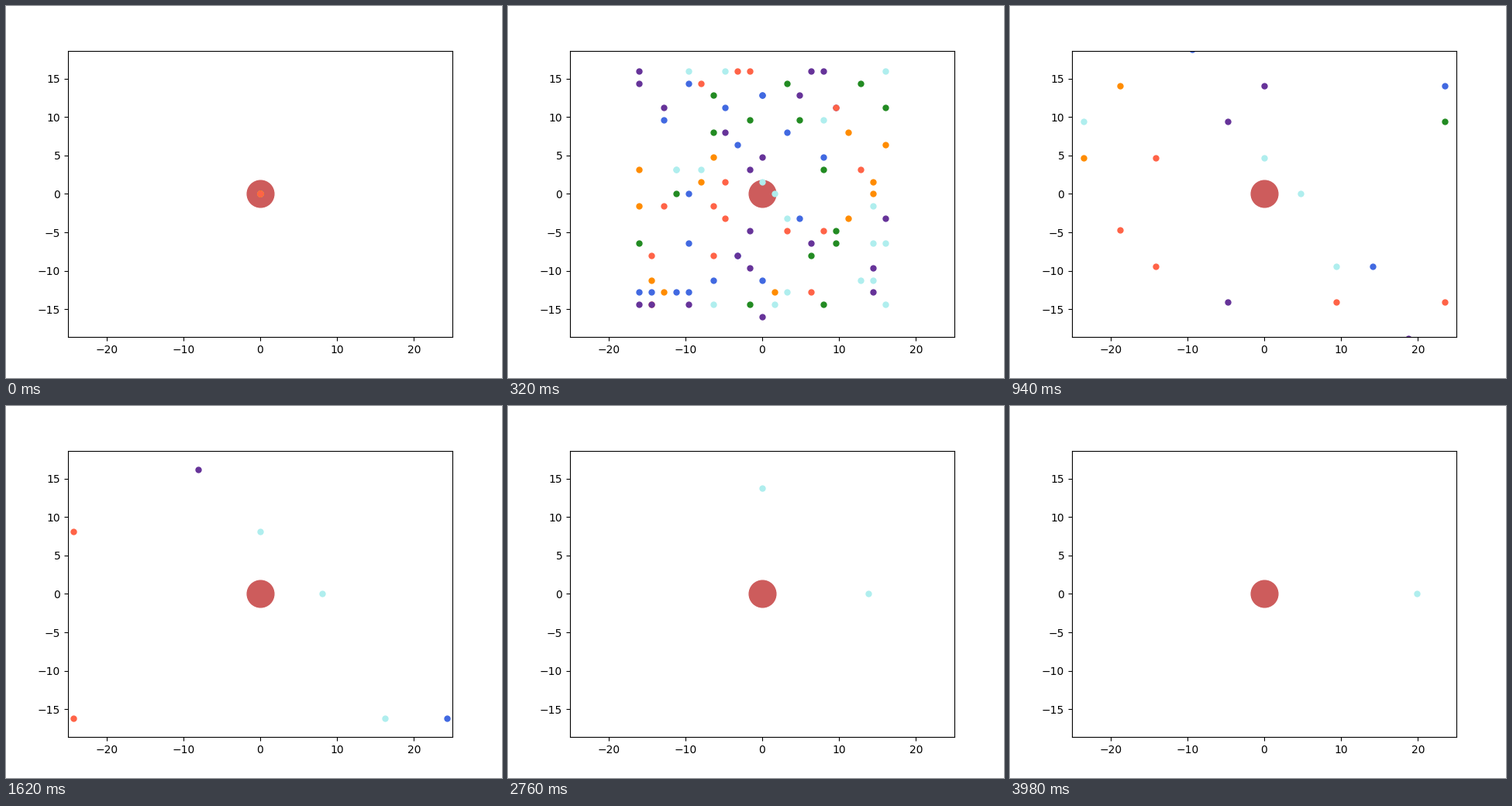
A matplotlib script that plays this animation: 640 by 480 pixels, repeating every 4000 ms.

```python
import random

import matplotlib.pyplot as plt
from matplotlib.animation import FuncAnimation

FRAMES = 200
INTERVAL = 20
STEP = 0.1
HALF_W = 25
DOTS = 100
TOP_SPEED = 10
COLORS = ["royalblue", "forestgreen", "rebeccapurple",
          "paleturquoise", "darkorange", "tomato"]

# The slow dots stay in view longest, so their velocities are set by hand.
SLOW = [
    ("royalblue", -2, 4), ("royalblue", 5, 3), ("royalblue", 3, -2),
    ("forestgreen", 5, 2),
    ("rebeccapurple", 0, 3), ("rebeccapurple", -1, 2),
    ("rebeccapurple", -1, -3), ("rebeccapurple", 4, -4),
    ("paleturquoise", 0, 1), ("paleturquoise", 1, 0),
    ("paleturquoise", 2, -2), ("paleturquoise", -5, 2),
    ("tomato", -3, 1), ("tomato", -4, -1), ("tomato", -3, -2),
    ("tomato", 2, -3),
    ("darkorange", -5, 1), ("darkorange", -4, 3),
    ("tomato", 5, -3),
]


def fast_dot(rng):
    """Random colour and whole-number velocity outside the slow range."""
    vx = vy = 0
    while abs(vx) <= 5 and abs(vy) <= 4:
        vx = rng.randint(-TOP_SPEED, TOP_SPEED)
        vy = rng.randint(-TOP_SPEED, TOP_SPEED)
    return rng.choice(COLORS), vx, vy


fig, ax = plt.subplots(figsize=(6.4, 4.8), dpi=100)
half_h = HALF_W * (0.77 * 4.8) / (0.775 * 6.4)
ax.set_xlim(-HALF_W, HALF_W)
ax.set_ylim(-half_h, half_h)
ax.plot(0, 0, "o", color="indianred", markersize=25)

rng = random.Random(4)
swarm = [fast_dot(rng) for _ in range(DOTS - len(SLOW))] + SLOW
dots = [ax.plot(0, 0, "o", color=color, markersize=5)[0]
        for color, _, _ in swarm]


def update(frame):
    dist = STEP * frame
    for dot, (_, vx, vy) in zip(dots, swarm):
        dot.set_data([vx * dist], [vy * dist])
    return dots


anim = FuncAnimation(fig, update, frames=FRAMES, interval=INTERVAL)
plt.show()
```
